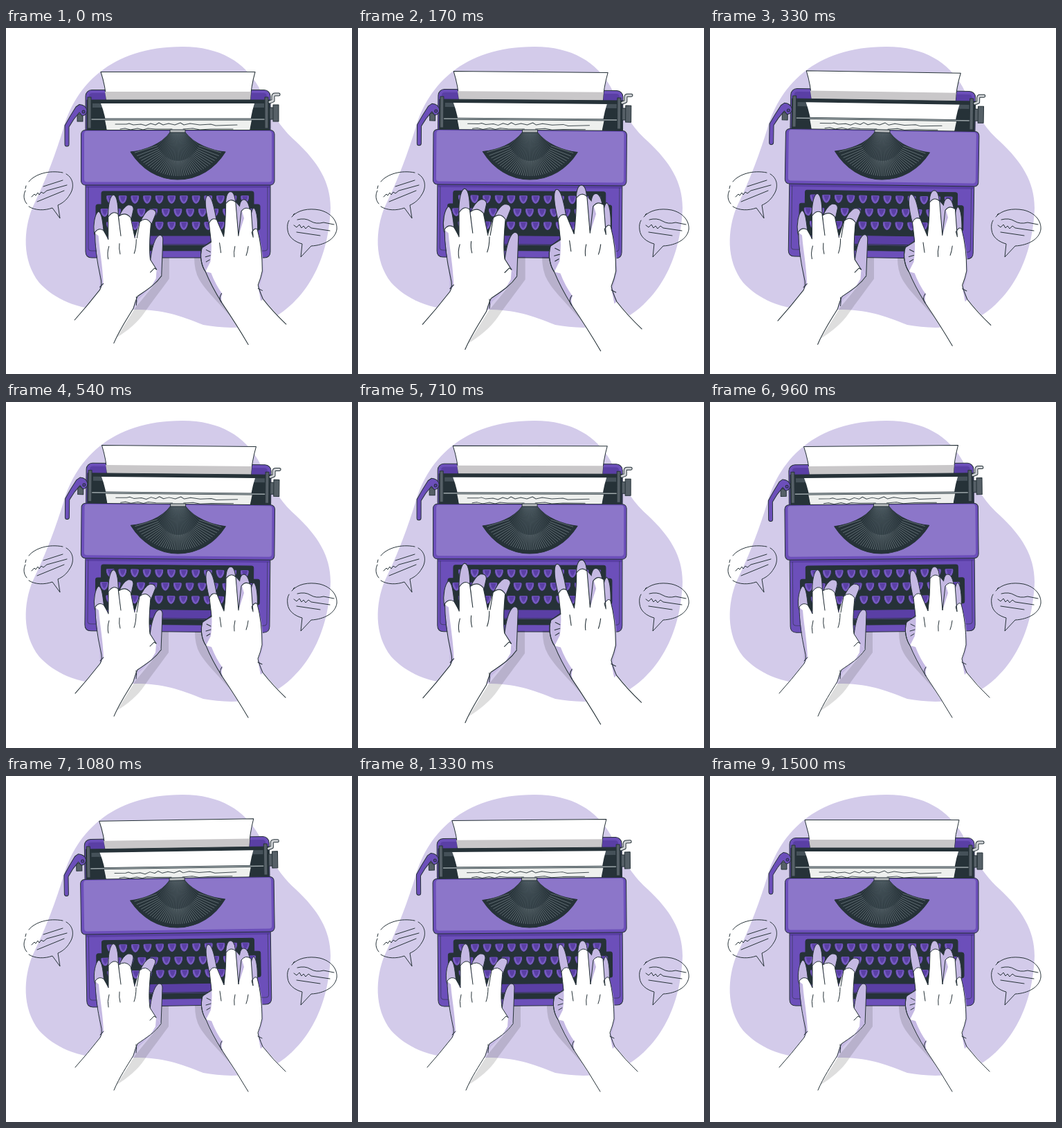
Write an HTML page that moves like this. It is 500 by 500 pixels and loops after 1.54 s.

```html
<!DOCTYPE html>
<html lang="en">
<head>
<meta charset="utf-8">
<title>Typing</title>
<style>
html, body { margin: 0; width: 100%; height: 100%; overflow: hidden; background: #fff; }
svg { display: block; width: 100vw; height: 100vh; }
.ink { fill: none; stroke: #263238; stroke-width: 1; stroke-linecap: round; stroke-linejoin: round; }
.line { stroke: #263238; stroke-width: 1; stroke-linejoin: round; }
.body { fill: #6c4fba; }
.deep { fill: #5a3fa5; }
.pale { fill: #8c76c9; }
.dark { fill: #263238; }
.steel { fill: #566067; }
.lilac { fill: #c5b9e3; }
.white { fill: #fff; }
.shade { fill: #000; opacity: .13; }
</style>
</head>
<body>
<svg viewBox="0 0 500 500">
  <defs>
    <path id="fanShape" d="M237 151C225 168 200 177 180 179C196 204 220 219 248 219C278 219 302 203 317 179C297 177 272 168 259 151Z"/>
    <clipPath id="fanClip"><use href="#fanShape"/></clipPath>
    <g id="key">
      <path class="body line" stroke-width=".7" d="M-6.5-5Q-6-6.5-4-6.5H4Q6-6.5 6.5-5C7 1 3 6.5 0 6.5S-7 1-6.5-5Z"/>
      <path fill="none" stroke="#8c76c9" stroke-width=".7" d="M-4.500-4.500C-4 1-2 4 0 4.500S4 1 4.500-4.500"/>
      <path class="deep" d="M-3.500-5H4Q4 0 0 3Q-3 0-3.500-5Z"/>
    </g>
  </defs>

  <path fill="#d3cbea" d="M255 27C310 27 345 50 365 85C382 120 397 145 419 164C450 193 469 222 469 260C467 320 445 385 385 420C350 437 315 434 285 429C250 415 228 407 185 407Q165 406 150 407C105 408 70 392 48 368C22 335 26 290 38 260C60 215 72 180 83 145C100 85 150 27 255 27Z"/>

  <g class="ink">
    <path d="M33 222C42 211 62 205 82 209M87 211C98 217 99 231 92 241C88 248 82 253 75 256L78 275L67 260C56 264 42 264 33 258M30 254C25 248 25 241 28 235M28 232L29 228"/>
    <path d="M54 229L82 220M37 244L41 240L43 242L46 238L48 241L51 237L54 239L59 235L88 227M45 251L84 235"/>
    <path d="M413 273C421 263 437 260 453 263C470 267 479 279 478 291C476 305 460 314 441 315L426 331L428 312C417 309 408 302 407 292C406 286 407 281 409 278M415 270L417 268"/>
    <path d="M421 277Q432 274 440 279T459 281L474 284M416 285L420 288L424 284L427 289L430 286L433 290L437 286L441 289L468 293M420 295L454 300"/>
  </g>

  <g id="machine">
    <rect class="body line" x="115" y="89.500" width="267" height="80" rx="9"/>
    <path class="deep" d="M120 104V98Q120 94 125 94H372Q377 94 377 99V104Z"/>
    <path class="white line" d="M137 63.500H360Q354 85 353 105H145Q144 85 137 63.500Z"/>
    <path fill="#c9c7c9" d="M143 92H354L353 104H145Z"/>
    <rect class="dark line" x="117" y="104" width="264" height="43"/>
    <path fill="#455159" d="M125 109H373V115H125Z"/>
    <path class="white" d="M137 109H359Q353 128 352 148H146Q144 127 137 109Z"/>
    <path fill="#eef0ee" d="M143 133H355L352 148H146Z"/>
    <path class="ink" stroke-width=".7" opacity=".85" d="M158 139H174L178 138L184 140L195 139L202 141L209 138L216 140L221 137L227 140L235 138L244 140L252 137L257 140L266 138L280 140L296 139L303 141L334 140M165 146L172 145L180 147L190 145L198 147L205 145L216 146H240M256 146L270 145L280 147L296 146H328"/>
    <path d="M119 132H379" fill="none" stroke="#263238" stroke-width="3"/>
    <path d="M119 132H379" fill="none" stroke="#9ba5a8" stroke-width="1.4"/>
    <path class="steel line" d="M118 100H123V145H118ZM374 100H379V145H374ZM381 115H386V132H381ZM386 111H394V135H386ZM103 124H111V135H103Z"/>
    <path fill="none" stroke="#263238" stroke-width="5" stroke-linejoin="round" stroke-linecap="round" d="M381 107L386 105V99Q386 96 389 96H394"/>
    <path fill="none" stroke="#cfd2d5" stroke-width="3" stroke-linejoin="round" stroke-linecap="round" d="M381 107L386 105V99Q386 96 389 96H394"/>
    <path class="body line" d="M101 114L106 110.500Q115 111 117 119Q117 126 110 127L106 122Q97 132 91 143V168Q91 171 88 171T85 168V141Q92 128 101 114Z"/>
    <circle class="deep line" cx="112" cy="121" r="2"/>

    <path class="body line" d="M115 222H382V323Q382 332 373 332H124Q115 332 115 323Z"/>
    <path class="deep" d="M116 227H381V231H116Z"/>
    <path class="ink" opacity=".55" d="M119 230V318Q119 322 124 322H373Q378 322 378 318V230"/>
    <rect class="body line" x="108.500" y="147.500" width="279.500" height="79.500" rx="6"/>
    <rect class="pale" x="113" y="149" width="271" height="73.500" rx="4"/>
    <use href="#fanShape" class="dark line"/>
    <g id="fan" clip-path="url(#fanClip)" fill="none"></g>
    <path fill="#b9bdbf" class="line" d="M237 147H259V151H237Z"/>

    <path class="dark line" d="M138 239Q138 236 141 236H355Q358 236 358 239V255H364Q367 255 367 258V289Q367 292 364 292H361V301H133V275H130V258Q130 255 133 255H138Z"/>
    <g id="keys"></g>
    <rect class="deep line" x="150" y="300" width="196" height="13"/>
    <rect class="dark" x="150" y="314" width="196" height="8"/>
  </g>

  <g id="leftHand">
    <path class="shade" d="M222 332H235V362C222 380 210 395 200 410C190 425 175 437 160 446L187 403L224 358Z"/>
    <path class="lilac line" d="M128 298C126 285 129 270 134 266C139 268 140 281 142 298L138 320Z"/>
    <path class="lilac line" d="M148 282C147 265 149 245 155 242.500C161 243 163 260 162 282Z"/>
    <path class="lilac line" d="M163 274Q169 260 176 257Q184 256 184 263L180 281Z"/>
    <path class="lilac line" d="M193 283Q200 266 208 263Q216 263 216 269L208 289Z"/>
    <path class="lilac line" d="M207 350C208 330 212 304 221 300Q226 300 226 306L224 358L214 365Z"/>
    <path class="white" d="M129 297Q134 289 141 293L148 306V274Q155 264 162 270L166 301L163 273Q172 266 180 275L186 304L193 281Q202 273 209 283C207 304 206 320 208 335L217 349L224 358C215 371 203 378 190 387Q187 393 184 404C175 419 164 435 156 454L100 421L136 378C139 369 138 364 136 355C133 335 130 315 129 297Z"/>
    <path class="lilac" d="M224 358C213 371 203 378 190 387Q187 393 184 404L192 391Q208 377 216 362L217 349ZM129 297C131 325 135 342 136 378L141 370C140 342 136 325 134 301Z"/>
    <g class="ink">
      <path d="M100 421Q118 401 136 378Q140 371 137 360C132 338 129 315 129 296Q134 289 141 293Q146 301 148 306V274Q155 264 162 270L166 301M163 273Q172 266 180 275L186 304M189 304L193 281Q202 273 209 283C207 304 206 320 208 335L217 349M224 358C215 371 203 378 190 387Q187 393 184 404C175 419 164 435 156 454"/>
      <path d="M149 316Q146 326 148 334M164 312Q163 320 165 327M188 306Q188 318 185 326M208 353L214 347L217 349M136 374L141 369M188 400Q189 394 188 388"/>
    </g>
  </g>

  <g id="rightHand">
    <path class="shade" d="M273 332H285L290 352L312 396L337 433C318 404 292 384 280 363Q273 351 273 332Z"/>
    <path class="lilac line" d="M294 284C290 268 287 249 291 244C297 241 301 257 305 281Z"/>
    <path class="lilac line" d="M318 262C317 246 320 238 325 238Q332 239 332 262Z"/>
    <path class="lilac line" d="M337 285C336 258 338 249 344 249C350 250 352 260 354 275Z"/>
    <path class="lilac line" d="M354 300C352 279 354 263 358 261C363 265 364 284 363 300Z"/>
    <path class="lilac line" d="M298 308L284 318C280 331 284 345 289 352L304 370Z"/>
    <path class="white" d="M294 283Q298 274 305 278L315 302Q318 277 318 255Q325 246 332 253L336 301L340 266Q346 258 354 264L356 301V296Q360 288 363 292C368 310 370 333 370 351Q368 362 364 374L371 391L404 427L350 456L312 396Q297 372 289 352L296 338Q299 315 296 300Z"/>
    <path class="lilac" d="M363 294C368 310 370 333 370 351L364 374L368 394L371 391L366 374L372 352C371 326 368 307 363 294ZM289 352Q297 372 316 402Q309 391 313 384Q303 370 297 354ZM332 253L336 301L344 276L340 262Z"/>
    <g class="ink">
      <path d="M289 352C284 345 280 331 284 318L297 310L296 300L294 283Q298 274 305 278L315 302Q318 277 318 255Q325 246 332 253L336 301L340 266Q346 258 354 264L357 303L355 296Q360 288 363 292C368 310 370 333 370 351Q368 361 364 371Q365 377 371 391Q385 409 404 427M289 352Q297 372 312 396Q333 427 350 456"/>
      <path d="M309 311L311 325M331 316Q329 324 330 331M350 316Q349 324 347 329M290 321L296 324M289 331L296 329M290 338L295 335M312 396Q307 390 312 383M364 376L370 379"/>
    </g>
  </g>
</svg>
<script>
const byId = id => document.getElementById(id);
const add = (parent, tag, attrs) => {
  const node = document.createElementNS("http://www.w3.org/2000/svg", tag);
  for (const name in attrs) node.setAttribute(name, attrs[name]);
  parent.append(node);
};

// Three staggered rows of keys
[[248, 151, 12], [267, 142.5, 13], [286, 151, 12]].forEach(([y, start, count]) => {
  for (let i = 0; i < count; i++)
    add(byId("keys"), "use", { href: "#key", x: start + 17.65 * i, y });
});

// Type bars: fine near the hub, brighter beyond the inner arc
for (let i = -20; i <= 20; i++) {
  const u = i / 20.5;
  const drop = (1 - u * u) ** 0.8;
  const [midX, midY] = [248.5 + 31 * u, 168 + 24 * drop];
  add(byId("fan"), "path", {
    d: `M${248 + 9 * u} 150L${midX} ${midY}`, stroke: "#66747b", "stroke-width": 0.4
  });
  add(byId("fan"), "path", {
    d: `M${midX} ${midY}L${248.5 + 64 * u} ${177 + 37 * drop}`, stroke: "#87949a", "stroke-width": 0.6
  });
}

// Linear interpolation through [time, value] pairs
const sample = (keys, t) => {
  const i = keys.findIndex(([time]) => time > t);
  const [[t0, v0], [t1, v1]] = [keys[i - 1], keys[i]];
  return v0 + (v1 - v0) * (t - t0) / (t1 - t0);
};

const LOOP = 1540;
const tilt = [[0, 0], [375, 1], [1125, -1], [1500, 0], [1541, 0]];
const beat = [[-25, 1], [170, 1.1], [400, 1], [540, 1], [690, 1.1], [900, 1], [1541, 1]];
const scaleAbout = (x, y, s) => `translate(${x} ${y}) scale(${s}) translate(${-x} ${-y})`;

function draw(now) {
  const t = now % LOOP;
  const size = sample(beat, t);
  byId("machine").setAttribute("transform", `rotate(${sample(tilt, t)} 248 210)`);
  byId("leftHand").setAttribute("transform", scaleAbout(168, 348, size));
  byId("rightHand").setAttribute("transform", scaleAbout(343, 348, size));
}

const start = performance.now();
function tick() {
  draw(performance.now() - start);
  requestAnimationFrame(tick);
}
draw(0);
requestAnimationFrame(tick);
</script>
</body>
</html>
```
